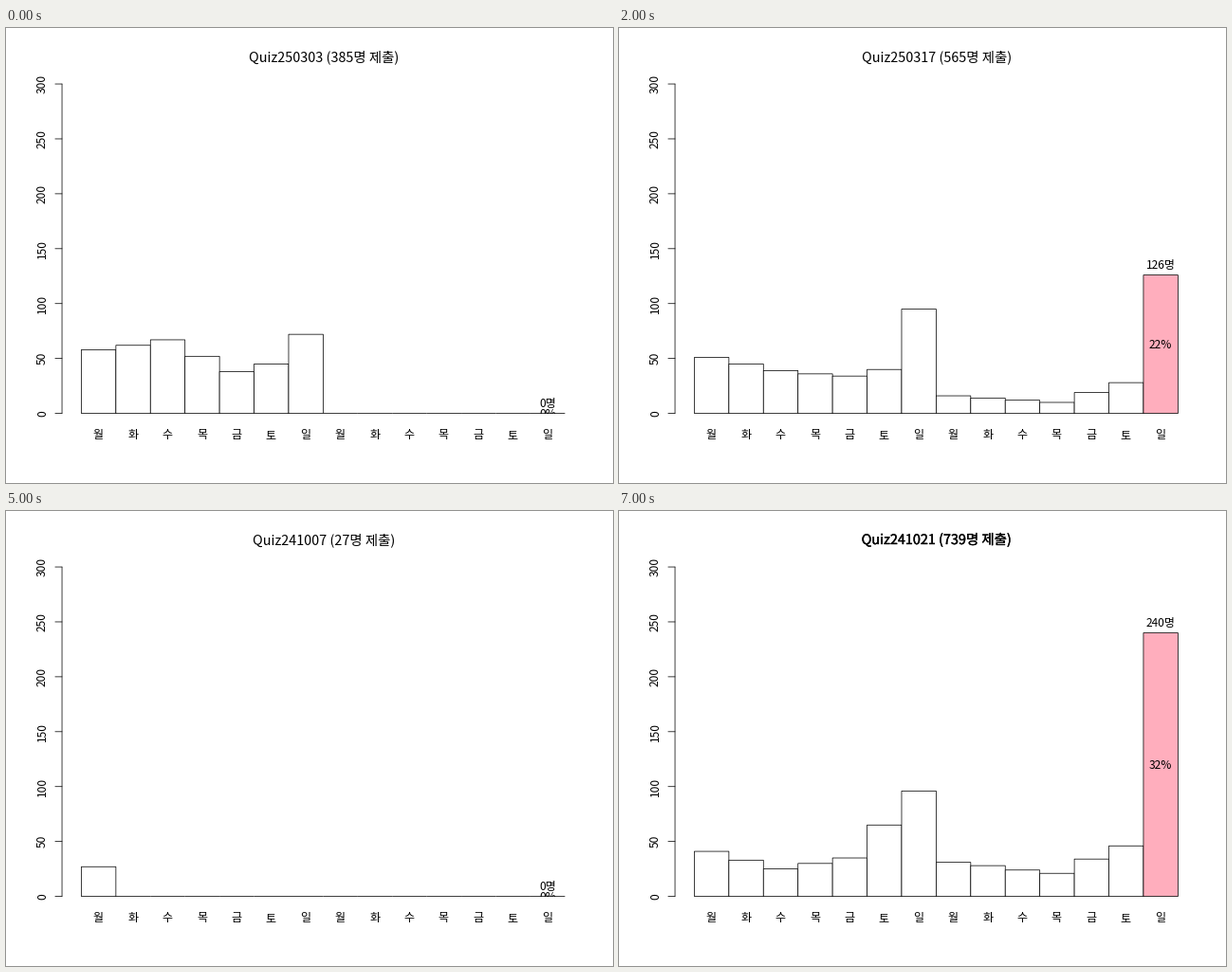
Write a matplotlib script that moves like this. It is 640 px wide and 480 px high and loops after 8 s.

```python
import numpy as np
import matplotlib.pyplot as plt
from matplotlib.animation import FuncAnimation
from matplotlib.patches import Rectangle
from matplotlib.patheffects import withStroke

W, H, DPI = 640, 480, 100
PX = 72 / DPI  # points per pixel
LINE = 0.75 * PX
FONT = "Noto Sans CJK JP"
PINK = "#ffaebd"
DAYS = "월화수목금토일" * 2
LAST = len(DAYS) - 1

# Plot region in pixels
LEFT, RIGHT, TOP, BASE = 59.04, 609.76, 59.04, 406.56
Y_MAX = 300
BAR_X = 79.44
BAR_W = (RIGHT - LEFT) / 1.08 / len(DAYS)

# Mon, Wed, Fri, Sat, Sun of week one, then Mon, Thu, Sat, Sun of week two
KEY_DAYS = [0, 2, 4, 5, 6, 7, 10, 12, 13]


def quiz(start, week, keys, total=None, style="plain"):
    """Fill the days between the key days; days after the last key stay empty."""
    date = np.datetime64(start) + 7 * week
    counts = np.interp(range(len(DAYS)), KEY_DAYS[:len(keys)], keys, right=0)
    counts = np.rint(counts).astype(int)
    name = "Quiz" + str(date).replace("-", "")[2:]
    return name, total or counts.sum(), style, counts


second = np.array([55, 34, 31, 39, 94, 21, 9, 28, 111])
fourth = np.array([47, 44, 36, 40, 96, 12, 11, 29, 142])
typical = (second + fourth) / 2
SPRING, AUTUMN = "2025-03-03", "2024-10-07"

QUIZZES = [
    quiz(SPRING, 0, [58, 67, 38, 45, 72], 385),
    quiz(SPRING, 1, second, 563, "bold"),
    quiz(SPRING, 2, typical),
    quiz(SPRING, 3, fourth, 564),
    quiz(SPRING, 4, typical[:5]),
    quiz(AUTUMN, 0, [27]),
    quiz(AUTUMN, 1, [96, 52, 44, 53, 72, 13, 11, 57, 197], 744),
    quiz(AUTUMN, 2, [41, 25, 35, 65, 96, 31, 21, 46, 240], 739, "medium"),
]

fig = plt.figure(figsize=(W / DPI, H / DPI), dpi=DPI, facecolor="white")
ax = fig.add_axes([0, 0, 1, 1])


def y_of(value):
    return BASE - value / Y_MAX * (BASE - TOP)


def label(x, y, text, size=12, **kw):
    return ax.text(x, y, text, fontsize=size * PX, family=FONT, color="black",
                   ha="center", va="baseline", rotation_mode="anchor", **kw)


def line(xs, ys):
    ax.plot(xs, ys, color="black", lw=LINE, solid_capstyle="round", snap=False)


def draw_axis(size):
    line([LEFT, LEFT], [TOP, BASE])
    for v in range(0, Y_MAX + 1, 50):
        y = y_of(v)
        line([LEFT - 7.2, LEFT], [y, y])
        label(42, y, str(v), size, rotation=90)


def draw_title(name, total, style):
    title = label(334.8, 35, f"{name} ({total}명 제출)", 14.4,
                  weight="bold" if style == "bold" else "normal")
    if style == "medium":
        title.set_path_effects([withStroke(linewidth=0.35 * PX,
                                           foreground="black")])


def draw_bars(counts, total, size):
    for i, (day, n) in enumerate(zip(DAYS, counts)):
        x = BAR_X + i * BAR_W
        ax.add_patch(Rectangle((x, BASE), BAR_W, y_of(n) - BASE, lw=LINE,
                               ec="black", fc=PINK if i == LAST else "white",
                               snap=False))
        label(x + BAR_W / 2 - 0.5, 433, day)

    n, mid = counts[LAST], BAR_X + (LAST + 0.5) * BAR_W
    label(mid, y_of(n) - 7, f"{n}명", size)
    share = label(mid, y_of(n / 2) + 4.4, f"{100 * n / total:.0f}%", size,
                  clip_on=True)
    share.set_clip_path(Rectangle((LEFT, BASE), RIGHT - LEFT, TOP - BASE,
                                  transform=ax.transData))


def draw(frame):
    name, total, style, counts = QUIZZES[frame]
    size = 12.6 if style == "bold" else 12
    ax.clear()
    ax.set(xlim=(0, W), ylim=(H, 0))
    ax.axis("off")
    draw_axis(size)
    draw_bars(counts, total, size)
    draw_title(name, total, style)
    return []


anim = FuncAnimation(fig, draw, frames=len(QUIZZES), interval=1000,
                     repeat=True, repeat_delay=0, blit=False)
plt.show()
```
